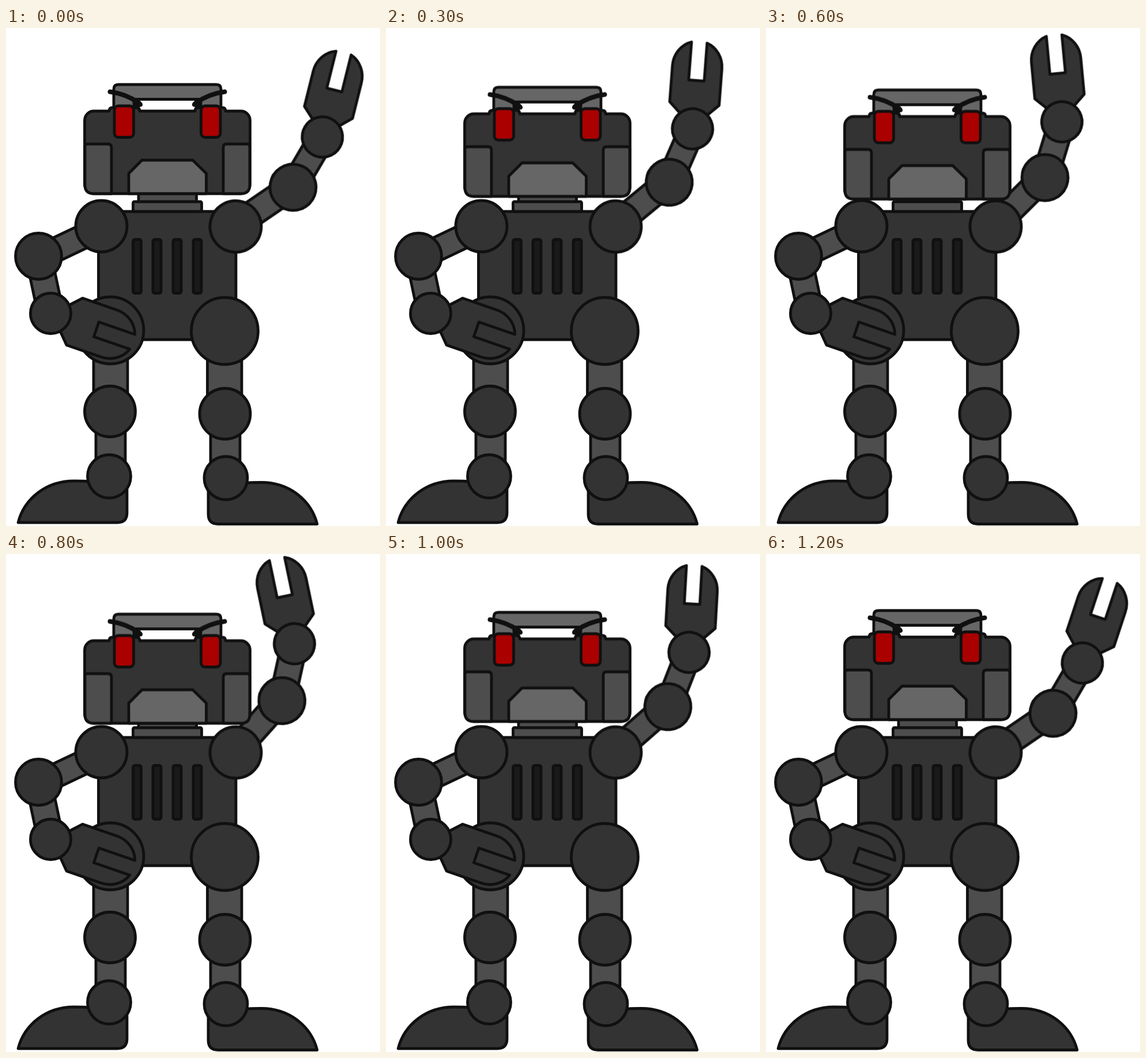
Recreate the animation shown at these times as an HTML page without scripts. Size 649 px wide and 863 px high, loop 1300 ms.

```html
<!DOCTYPE html>
<html lang="en">
<head>
<meta charset="utf-8">
<title>Waving robot</title>
<style>
  html, body { margin: 0; width: 100%; height: 100%; overflow: hidden; background: #fff; }
  svg { display: block; width: 649px; height: 863px; }
  .robot { fill: #333; stroke: #101010; stroke-width: 4.8; stroke-linejoin: round; stroke-linecap: round; }
  .mid { fill: #4d4d4d; }
  .light { fill: #666; }
  .slot { fill: #1a1a1a; }
  .eye { fill: #a00; }
  .brow { fill: none; stroke-width: 8; }

  .head, .arm, .forearm, .hand { animation: 1300ms infinite; }
  .head { animation-name: nod; }
  .arm { animation-name: arm; }
  .forearm { animation-name: forearm; }
  .hand { animation-name: hand; }

  @keyframes nod {
    0% { transform: translateY(0); animation-timing-function: steps(6); }
    46.154% { transform: translateY(9.4px); animation-timing-function: steps(6); }
    92.308%, 100% { transform: translateY(0); }
  }
  @keyframes arm {
    0% { transform: rotate(-34.3deg); animation-timing-function: steps(8); }
    61.538% { transform: rotate(-48.2deg); animation-timing-function: steps(4); }
    92.308%, 100% { transform: rotate(-34.3deg); }
  }
  @keyframes forearm {
    0% { transform: rotate(-25.4deg); animation-timing-function: steps(8); }
    61.538% { transform: rotate(-29.4deg); animation-timing-function: steps(4); }
    92.308%, 100% { transform: rotate(-25.4deg); }
  }
  @keyframes hand {
    0% { transform: rotate(73.7deg); animation-timing-function: steps(8); }
    61.538% { transform: rotate(65.8deg); animation-timing-function: steps(4); }
    92.308%, 100% { transform: rotate(78deg); }
  }
</style>
</head>
<body>
<svg viewBox="0 0 649 863">
  <defs>
    <path id="claw" d="M-20-22 L-43-44 V-107 A43 45 0 0 1 -13-150 V-84 H14 V-150 A43 45 0 0 1 43-107 V-44 L20-22Z"/>
    <path id="foot" d="M21 857 C32 815 70 785 118 785 C150 785 190 788 210 800 V840 Q210 857 193 857Z"/>
    <rect id="slat" y="366.500" width="14" height="93" rx="3"/>
    <g id="face">
      <path class="mid" d="M141 201 H177 Q183 201 183 207 V287 H152 Q137 287 137 272 V205 Q137 201 141 201Z"/>
      <path d="M179 148 V144 Q179 138 185 138 H226 Q232 138 232 144 V148" stroke="none"/>
      <path d="M179 144 Q179 138 185 138 H226 Q232 138 232 144" fill="none"/>
      <rect class="eye" x="188" y="135" width="33.500" height="54.500" rx="7"/>
      <path class="brow" d="M180.500 110.500 Q208 114 231 130 M226 134 L233 132.500"/>
    </g>
  </defs>

  <g class="robot">
    <!-- legs -->
    <rect class="mid" x="152" y="560" width="59" height="90"/>
    <rect class="mid" x="156" y="680" width="51" height="90"/>
    <rect class="mid" x="349.500" y="560" width="59.500" height="90"/>
    <rect class="mid" x="355" y="680" width="51" height="90"/>
    <use href="#foot"/>
    <use href="#foot" transform="matrix(-1 0 0 1 561 2.500)"/>
    <circle cx="180.500" cy="664.500" r="44"/>
    <circle cx="179" cy="777" r="37.500"/>
    <circle cx="380" cy="668.500" r="44"/>
    <circle cx="381.500" cy="780" r="37.500"/>

    <!-- neck and torso -->
    <rect class="mid" x="230" y="270" width="100.500" height="40"/>
    <rect x="160.500" y="318" width="238.500" height="222"/>
    <rect class="mid" x="220.500" y="301" width="119" height="17" rx="2"/>
    <g class="slot">
      <use href="#slat" x="220.500"/>
      <use href="#slat" x="255"/>
      <use href="#slat" x="290"/>
      <use href="#slat" x="325"/>
    </g>
    <circle cx="181" cy="524" r="58"/>
    <circle cx="379.500" cy="525" r="58"/>

    <!-- resting arm -->
    <g transform="translate(56.500 395.500) rotate(-25.400)">
      <rect class="mid" y="-18" width="121" height="41"/>
    </g>
    <g transform="translate(56.500 395.500) rotate(78)">
      <rect class="mid" y="-22" width="100" height="44"/>
    </g>
    <use href="#claw" transform="translate(77.500 494.500) rotate(109)"/>
    <circle cx="165.500" cy="343.500" r="44.500"/>
    <circle cx="56.500" cy="395.500" r="40"/>
    <circle cx="77.500" cy="494.500" r="35"/>

    <!-- waving arm -->
    <g transform="translate(398.500 344)">
      <g class="arm">
        <rect class="mid" y="-24" width="120" height="44"/>
        <g transform="translate(120.500 0)">
          <g class="forearm">
            <rect class="mid" y="-22" width="101" height="44"/>
            <g transform="translate(101 0)">
              <use class="hand" href="#claw"/>
              <circle r="35"/>
            </g>
          </g>
          <circle r="40"/>
        </g>
        <circle r="44.500"/>
      </g>
    </g>

    <!-- head -->
    <g class="head">
      <path class="light" d="M187 150 V106 Q187 98 195 98 H365 Q373 98 373 106 V150 H338 V123.500 H222 V150Z"/>
      <rect x="136.500" y="144" width="287" height="143" rx="16"/>
      <path class="light" d="M213 287 V252 L236 229 H324 L347.500 252 V287Z"/>
      <use href="#face"/>
      <use href="#face" transform="matrix(-1 0 0 1 560 0)"/>
    </g>
  </g>
</svg>
</body>
</html>
```
